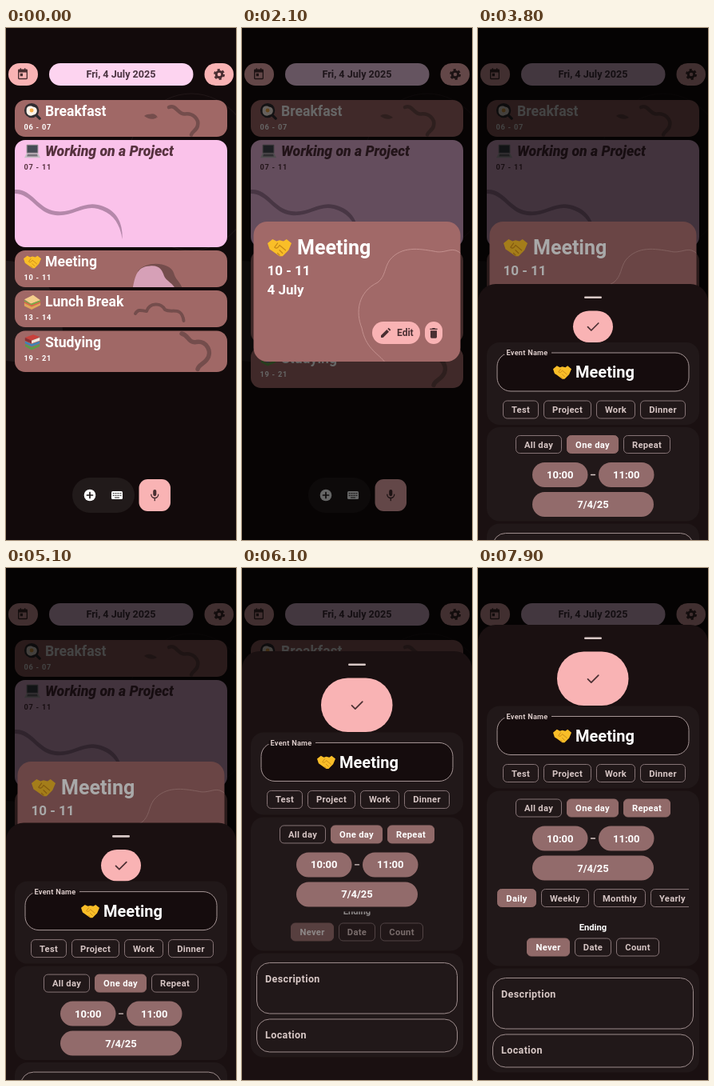
These frames come from a looping animation (288 px wide and 640 px high, 8000 ms). An HTML page:

```html
<!DOCTYPE html>
<html lang="en">
<head>
<meta charset="utf-8">
<title>Day planner</title>
<style>
html, body { margin: 0; width: 100%; height: 100%; overflow: hidden; background: #120a0b; }
svg { display: block; width: 288px; height: 640px; font: 700 11.2px Roboto, sans-serif; }
.title { font-size: 17.6px; }
.time { font-size: 9.2px; letter-spacing: .75px; }
.mid { text-anchor: middle; }
.chip { letter-spacing: .3px; text-anchor: middle; }
.field { font-size: 12.5px; letter-spacing: .4px; fill: #d8c8c6; }
.line { fill: none; stroke-linecap: round; stroke-linejoin: round; }
</style>
</head>
<body>
<svg id="stage" viewBox="0 0 288 640"></svg>
<script>
const CARD = '#a06866', PINK = '#fac2ea', ROSE = '#f9b3b4', DARK = '#4a2f32', WAVE = '#744d4c', MAUVE = '#926b6b';
const GROUP = '#211819', CHIP_ON = '#916a69', CHIP_LINE = '#867476', CHIP_TEXT = '#d6c5c4';
const rect = (x, y, w, h, r, fill, more = '') =>
  `<rect x="${x}" y="${y}" width="${w}" height="${h}" rx="${r}" fill="${fill}" ${more}/>`;
const path = (d, fill, more = '') => `<path d="${d}" fill="${fill}" ${more}/>`;
const line = (d, color, width = 1.5) => `<path class="line" d="${d}" stroke="${color}" stroke-width="${width}"/>`;
const text = (x, y, s, cls = '', fill = '#fff', more = '') =>
  `<text x="${x}" y="${y}" class="${cls}" fill="${fill}" ${more}>${s}</text>`;
const icon = (name, x, y, size) => `<use href="#${name}" x="${x}" y="${y}" width="${size}" height="${size}"/>`;
const symbol = (name, body) => `<symbol id="${name}" viewBox="0 0 24 24">${body}</symbol>`;

const label = (y, emoji, title, time, fill = '#fff', style = '') =>
  icon(emoji, 22, y + 3, 22) + text(49, y + 20, title, 'title', fill, style) + text(22.5, y + 37.3, time, 'time', fill);

function chip(x, x2, y, s, on, id = '') {
  const look = on ? `fill="${CHIP_ON}" stroke="${CHIP_ON}"` : `fill="${GROUP}" stroke="${CHIP_LINE}"`;
  return `<rect id="${id}" x="${x + .5}" y="${y}" width="${x2 - x - 1}" height="22" rx="5" ${look}/>` +
    text((x + x2) / 2, y + 15, s, 'chip', on ? '#fff' : CHIP_TEXT, id && `id="${id}Text"`);
}
const pill = (x, y, w, s) => rect(x, y, w, 31, 15.5, MAUVE) +
  text(x + w / 2, y + 20, s, 'mid', '#fff', 'font-size="13"');
const box = (y, h, s, base) => rect(18.5, y, 251, h, 16, GROUP, 'stroke="#9d8c8c"') + text(29, base, s, 'field');

const symbols =
  symbol('egg', line('M16 16l6 6', '#2d292c', 3.5) + '<circle cx="11" cy="11" r="10" fill="#302c30"/>' +
    path('M4 10c0-6 7-6 9-4 7 0 7 10 1 11-5 3-11 0-10-7z', '#fff4ea') + '<circle cx="11" cy="11" r="2.7" fill="#f8b04c"/>') +
  symbol('laptop', rect(4, 3, 16, 12, 1, '#8d898c') + rect(5.2, 4.2, 13.6, 9.6, 0, '#464b55') +
    path('M4 15h16l3 6H1z', '#c6bfc5') + path('M5.5 16h13l1 3h-15z', '#77727a')) +
  symbol('shake', path('M0 8l5-4 4 2 3-1 4 1 3-2 5 4-3 7-6 6-3 0-7-5-3-2z', '#f9be28') +
    line('M10 8l-3 4c2 2 4 0 5-2l6 5M12 20l-2-2M15 18l-3-3', '#c98a18', 1)) +
  symbol('sandwich', path('M1 9l12-6 10 7-13 5z', '#f3cd8c') + path('M1 10l9 5 13-5v3l-12 4-10-5z', '#7aad44') +
    path('M1 12l10 5 12-5v2l-12 5-10-5z', '#e0664a') + path('M1 14l10 5 12-5v3l-12 6-10-5z', '#e0a75a')) +
  symbol('books', path('M2 6l11-4 9 3-11 5z', '#c8413c') + path('M2 6l9 4v4l-9-4z', '#8f2f32') + path('M11 10l11-4v4l-11 4z', '#f1e6dc') +
    path('M2 11l9 4 11-4v3l-11 4-9-4z', '#3f83b6') + path('M2 15l9 4 11-4v3l-11 5-9-5z', '#5f9b48')) +
  symbol('calendar', path('M5 3h2V1h2v2h6V1h2v2h2q2 0 2 2v15q0 2-2 2H5q-2 0-2-2V5q0-2 2-2zM5 9v11h14V9zM7 11h5v5H7z', DARK, 'fill-rule="evenodd"')) +
  symbol('gear', `<circle cx="12" cy="12" r="5.6" fill="none" stroke="${DARK}" stroke-width="4.4"/>` +
    `<circle cx="12" cy="12" r="8.5" fill="none" stroke="${DARK}" stroke-width="4" stroke-dasharray="4.5 4.4"/>`) +
  symbol('mic', rect(9, 2, 6, 12, 3, DARK) + line('M5.5 11a6.5 6.5 0 0 0 13 0M12 18v4', DARK, 2)) +
  symbol('pencil', path('M3 17L14 6l4 4L7 21H3zM15.5 4.5l2-2 4 4-2 2z', DARK)) +
  symbol('trash', path('M6 8h12v12q0 2-2 2H8q-2 0-2-2zM5 4h4l1-1h4l1 1h4v2H5z', DARK));

const home =
  path('M0 291C42 291 71 340 71 382C71 410 40 421 0 416Z', '#201819') +
  '<ellipse cx="232" cy="180" rx="82" ry="98" fill="none" stroke="#211718"/>' +
  rect(3, 44, 37, 28, 14, ROSE) + icon('calendar', 13, 49.5, 16) +
  rect(54, 44, 180.5, 28, 14, '#fdd4f0') + text(144, 62.3, 'Fri, 4 July 2025', 'mid', '#4a3340', 'font-size="12.6"') +
  rect(248.5, 44, 36.5, 28, 14, ROSE) + icon('gear', 259, 50, 16) +
  rect(11, 90, 266, 46, 13, CARD) +
  path('M173 110C178 106 184 108 189 112C184 115 178 114 173 110Z', WAVE) +
  path('M175 111C181 106 187 106 190 112C186 110 181 110 175 111Z', WAVE, 'id="wisp"') +
  line('M204 99C213 95 215 108 224 107.5C234 106 242 114 240 122C239 128 233 129 232 133.5', WAVE, 4.6) +
  label(90, 'egg', 'Breakfast', '06 - 07') +
  rect(11, 140, 266, 134, 13, PINK) +
  path('M11 202C32 200 40 226 62 229S95 217 115 221S147 240 145.5 264C143 245 134 231 115 226S85 236 62 234S32 207 11 207Z', '#b488aa') +
  label(140, 'laptop', 'Working on a Project', '07 - 11', '#57323f', 'font-style="italic" font-weight="900"') +
  rect(11, 311, 266, 54, 0, CARD, 'id="join"') +
  rect(11, 278, 266, 46, 13, CARD, 'id="meeting"') +
  '<clipPath id="meetingClip"><rect id="meetingArea" x="11" y="278" width="266" height="46" rx="13"/></clipPath>' +
  '<g clip-path="url(#meetingClip)"><g id="blob">' +
  path('M163 311C174 297 204 300 208 313C211 325 221 325 220 345H200Z', WAVE) +
  path('M154 339C160 330 156 305 178 304.5C191 303 194 311 196 317C199 325 212 326 213.5 345H150Z', '#d6a0b7') + '</g></g>' +
  label(278, 'shake', 'Meeting', '10 - 11') +
  '<g class="pushed">' + rect(11, 328, 266, 46, 13, CARD) +
  line('M162 357C166 350 171 354 176 354C180 343 194 343 199 352C207 357 220 347 222.5 366', WAVE, 4) +
  label(328, 'sandwich', 'Lunch Break', '13 - 14') +
  rect(11, 378.5, 266, 51.5, 13, CARD) +
  line('M220 382C229 384 228 394 238 392.5C252 390 259 406 251 415C247 420 241 421 240 426.5', WAVE, 5.5) +
  label(378.5, 'books', 'Studying', '19 - 21') + '</g>' +
  rect(83, 562, 78, 44, 22, '#211a1a') +
  '<circle cx="105" cy="584" r="7.3" fill="#fff"/>' + line('M101.5 584h7M105 580.5v7', '#211a1a', 1.7) +
  rect(132, 579, 14, 10, 1.5, '#fff') +
  [581.7, 584.3].map(y => `<path d="M133.8 ${y}h10.6" stroke="#211a1a" stroke-width="1.3" stroke-dasharray="1.3 1"/>`).join('') +
  line('M136.5 587h5', '#211a1a', 1.2) +
  rect(166.5, 564, 39.5, 40, 11, ROSE) + icon('mic', 178, 575.5, 16.5);

const dialog =
  rect(14.5, 242, 259, 175, 17, '#a16968') +
  line('M273 281C262 272 255 283 240 279C222 276 200 272 185 290C178 300 180 310 170 318C145 330 142 355 150 375C155 400 168 405 178 416.5', '#c4918f', 1) +
  icon('shake', 32, 259, 30) + text(69, 283, 'Meeting', '', '#fff', 'font-size="25"') +
  text(31.5, 309, '10 - 11', '', '#fff', 'font-size="17"') + text(31.5, 333, '4 July', '', '#fff', 'font-size="17"') +
  rect(163, 367, 60, 28, 14, ROSE) + icon('pencil', 172, 373, 16) + text(194, 385.2, 'Edit', '', DARK, 'font-size="12"') +
  rect(229, 367, 22, 28, 11, ROSE) + icon('trash', 232, 373, 16);

const sheet =
  rect(0, 0, 288, 700, 22, '#1a1011') + rect(133, 15.5, 22, 2.6, 1.3, '#d8c8c6') +
  rect(119, 33.5, 50, 39.5, 20, ROSE, 'id="check"') + `<g id="tick">${line('M137.5 0l4.3 4.3 9-9', DARK, 1.7)}</g>` +
  '<g id="body">' + rect(11, 73, 266, 103, 16, GROUP) +
  rect(24, 86, 240, 48, 17, '#150c0d', 'stroke="#a69696"') + rect(33, 84, 59, 4, 0, '#1b1213') +
  text(35.5, 89.3, 'Event Name', '', '#d8c8c6', 'font-size="9.2" letter-spacing=".25"') +
  icon('shake', 94, 98.5, 23) + text(122, 117.3, 'Meeting', '', '#fff', 'font-size="20"') +
  chip(31, 76, 146, 'Test') + chip(82, 142, 146, 'Project') + chip(148, 197, 146, 'Work') + chip(203, 260, 146, 'Dinner') +
  rect(11, 179, 266, 117.5, 16, GROUP, 'id="schedule"') +
  chip(47, 105, 189.5, 'All day') + chip(111, 176, 189.5, 'One day', true) + chip(182, 241, 189.5, 'Repeat', false, 'repeat') +
  pill(68, 223, 69.5, '10:00') + line('M141.5 238.5h5', '#d8c8c6', 1.3) + pill(151, 223, 69.5, '11:00') + pill(68, 260, 152, '7/4/25') +
  '<clipPath id="optionsClip"><rect id="optionsArea" x="23.5" y="297" width="240.5" height="0"/></clipPath>' +
  '<g clip-path="url(#optionsClip)"><g id="options">' +
  chip(24, 73, 302, 'Daily', true) + chip(79, 139, 302, 'Weekly') + chip(145, 210, 302, 'Monthly') + chip(216, 271, 302, 'Yearly') +
  text(144, 353, 'Ending', 'mid') +
  chip(61, 115, 363.5, 'Never', true) + chip(121, 167, 363.5, 'Date') + chip(173, 227, 363.5, 'Count') + '</g></g>' +
  '<g id="notes">' + rect(11, 299.5, 266, 130, 16, GROUP) +
  box(311.5, 63.5, 'Description', 336.3) + box(382, 41, 'Location', 406.3) + '</g></g>';

const stage = document.getElementById('stage');
stage.innerHTML = `<defs>${symbols}</defs>` + rect(0, 0, 288, 640, 0, '#120a0b') + home +
  rect(0, 0, 288, 640, 0, '#000', 'id="dim"') + `<g id="dialog">${dialog}</g>` +
  rect(0, 0, 288, 640, 0, '#000', 'id="dim2"') + `<g id="sheet">${sheet}</g>`;

const set = (id, attrs) => {
  const el = document.getElementById(id);
  for (const key in attrs) el.setAttribute(key, attrs[key]);
};
const move = (x, y) => `translate(${x} ${y})`;
const mix = (a, b, p) => a + (b - a) * p;
const span = (t, a, b) => Math.min(1, Math.max(0, (t - a) / (b - a)));
const ease = (t, a, b) => 1 - (1 - span(t, a, b)) ** 3;
const pushed = stage.querySelector('.pushed');

function draw(t) {
  // Meeting card swells and pushes the later cards down
  const push = 20 * ease(t, 1100, 1585), merge = Math.min(1, push / 10);
  const height = 46 + push + 4 * merge;
  set('wisp', { opacity: 1 - span(t, 100, 900) });
  set('meeting', { height });
  set('meetingArea', { height });
  set('join', { opacity: merge, height: 34 + push });
  set('blob', { transform: move(2 * (1 - merge), 7 * (push / 10 - 1)) });
  pushed.setAttribute('transform', move(0, push));

  const open = ease(t, 1950, 2100), scale = mix(.9, 1, open);
  set('dim', { opacity: .6 * open });
  set('dialog', { opacity: open, transform: `${move(144, 330)} scale(${scale}) ${move(-144, -330)}` });

  // Sheet: half height, then as tall as its content up to a limit
  const rise = ease(t, 3300, 3700), grow = ease(t, 5550, 5850), extra = 101.5 * ease(t, 6000, 6505);
  const shift = 28.5 * grow, full = Math.max(71, 180 - shift - .96 * extra);
  set('dim2', { opacity: .34 * rise });
  set('sheet', { transform: move(0, mix(mix(640, 320, rise), full, ease(t, 5100, 5400))) });
  set('check', { x: mix(119, 99, grow), width: mix(50, 89.5, grow), height: mix(39.5, 67.5, grow), rx: mix(20, 33.5, grow) });
  set('tick', { transform: move(0, mix(53.7, 67.9, grow)) });
  set('body', { transform: move(0, shift) });
  const on = t >= 5600;
  set('repeat', { fill: on ? CHIP_ON : GROUP, stroke: on ? CHIP_ON : CHIP_LINE });
  set('repeatText', { fill: on ? '#fff' : CHIP_TEXT });
  set('schedule', { height: 117.5 + extra });
  set('optionsArea', { height: extra });
  set('options', { transform: move(0, extra - 101.5), opacity: extra / 101.5 });
  set('notes', { transform: move(0, extra) });
}

function tick() {
  draw(performance.now() % 8000);
  requestAnimationFrame(tick);
}
tick();
</script>
</body>
</html>
```
